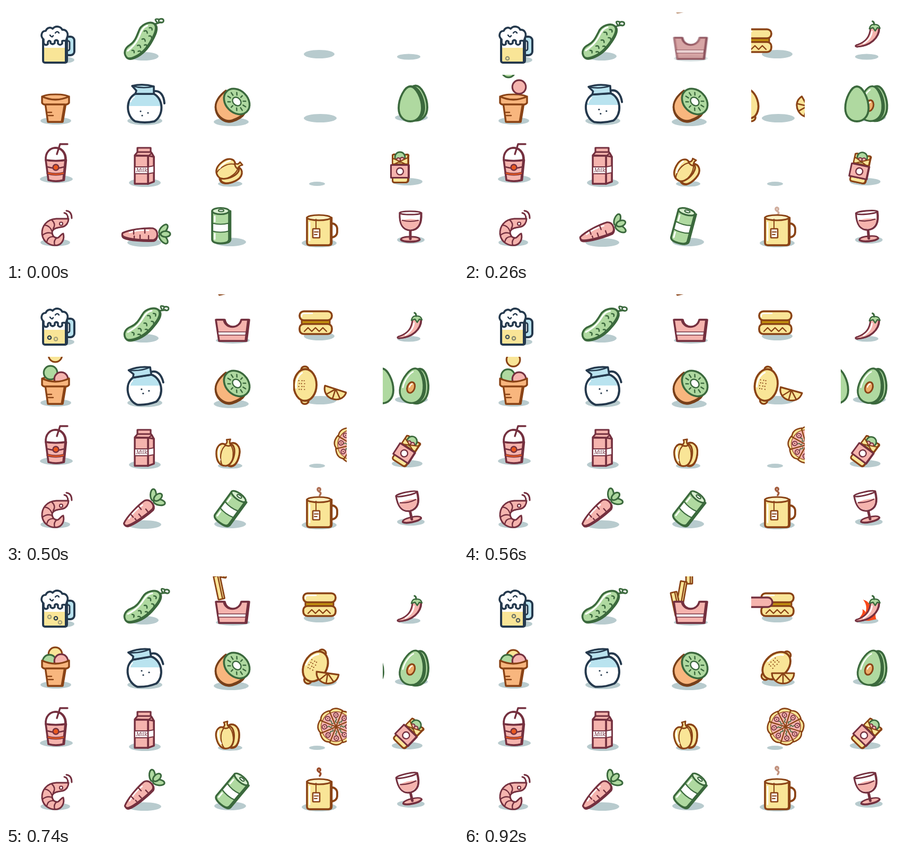
Animation of 853 by 480 pixels, one loop 0.98 s. Source, as an HTML page with a canvas:

```html
<!DOCTYPE html>
<html lang="en">
<head>
<meta charset="utf-8">
<title>Food icons</title>
<style>
html, body { margin: 0; width: 100%; height: 100%; overflow: hidden; background: #fff; }
canvas { display: block; }
</style>
</head>
<body>
<canvas id="stage" width="853" height="480"></canvas>
<script>
const ctx = document.getElementById('stage').getContext('2d');
const NAVY = '#25394d', BLUE = '#b9e3ef', LEAF = '#3b693d', GREEN = '#afd9a0';
const WINE = '#74303f', PINK = '#f5b4ae', BROWN = '#8a4316', YELLOW = '#f9e597';
const ORANGE = '#f8b67e', SHADOW = '#b8cbce', WHITE = '#fff', RED = '#e8581f';
let step = 0;

// Value at the current step, from step/value pairs.
function key(...p) {
  let i = 2;
  while (i < p.length - 2 && step > p[i]) i += 2;
  const u = Math.min(1, Math.max(0, (step - p[i - 2]) / (p[i] - p[i - 2])));
  return p[i - 1] + (p[i + 1] - p[i - 1]) * u;
}
function paint(path, fill, stroke, w = 4) {
  if (fill) { ctx.fillStyle = fill; ctx.fill(path); }
  if (stroke) { ctx.strokeStyle = stroke; ctx.lineWidth = w; ctx.stroke(path); }
}
const ink = (d, fill, stroke, w) => paint(new Path2D(d), fill, stroke, w);
function oval(x, y, rx, ry, fill, stroke, w, deg = 0) {
  const p = new Path2D();
  p.ellipse(x, y, rx, ry, deg * Math.PI / 180, 0, 7);
  paint(p, fill, stroke, w);
}
function box(x, y, w, h, r, fill, stroke, lw) {
  const p = new Path2D();
  p.roundRect(x, y, w, h, r);
  paint(p, fill, stroke, lw);
}
function pose(x, y, deg, draw) {
  ctx.save();
  ctx.translate(x, y);
  ctx.rotate(deg * Math.PI / 180);
  draw();
  ctx.restore();
}
const turn = (x, y, deg, draw) => pose(x, y, deg, () => { ctx.translate(-x, -y); draw(); });
// Outlined shape with a dark edge on one side.
function thick(d, fill, stroke, dx, dy, w) {
  pose(dx, dy, 0, () => ink(d, stroke, stroke, w));
  ink(d, fill, stroke, w);
}
function clip(x, y, draw) {
  ctx.save();
  ctx.beginPath();
  ctx.rect(x, y, 101, 101);
  ctx.clip();
  draw();
  ctx.restore();
}
function fade(alpha, draw) {
  ctx.save();
  ctx.globalAlpha = alpha;
  draw();
  ctx.restore();
}
const shade = (x, y, rx, ry) => oval(x, y, rx, ry, SHADOW);

function beer() {
  shade(101, 102, 28, 7);
  box(111, 58, 18, 35, 7, BLUE, NAVY, 4);
  box(112, 66, 8, 18, 3, WHITE, NAVY, 3);
  thick('M70 60V103Q70 107 75 107H108Q113 107 113 103V60Z', WHITE, NAVY, 2, 0);
  ink('M72 79H111V105H74Q72 105 72 102Z', YELLOW);
  [[82, 2, key(1, 0, 2, .5, 6, 1, 8, .7, 13, 0)], [94, 4, key(3, 0, 6, .4, 10, 1, 13, .65)],
   [102, 10, key(9, 0, 10, .4, 13, .8)]].forEach(([x, born, a]) =>
    fade(a, () => oval(x, 99 - 1.3 * (step - born), 3.2, 3.2, null, NAVY, 2.2)));
  ink('M71 63C64 57 67 47 75 47C77 41 84 39 88 43C94 36 104 39 106 45C114 44 119 52 115 60' +
    'L113 66Q109 65 106 66V71Q102 76 98 71V66Q95 63 92 66V70Q88 74 84 70V67Q81 64 79 68V72Q74 76 71 70Z',
    WHITE, NAVY, 3.6);
  ink('M83 55q4 6 6 1M93 51q4 -5 7 0', null, NAVY, 2.5);
}

function cucumber() {
  shade(260, 95, 28, 8);
  turn(238, 85, key(0, -12, 2, -6.5, 4, -3.5, 6, -1.5, 8, 0), () => {
    ink('M288 44C295 45 299 42 303 44C309 45 310 38 304 37C298 36 297 44 302 43M296 43Q289 32 300 37',
      null, LEAF, 3);
    thick('M225 94C221 86 225 77 236 73C247 69 252 60 258 51C264 40 282 36 289 43' +
      'C295 50 287 62 278 72C268 84 254 94 240 97C232 99 227 98 225 94Z', GREEN, LEAF, 1.5, 1.5, 3.6);
    ink('M230 83C241 77 250 72 260 56C265 48 270 45 276 44', null, WHITE, 3);
    ink('M238 84q5 0 3 5M250 77q6-1 5 5M261 67q6-1 5 5M268 53q6-1 5 5M279 49q6 0 4 5' +
      'M249 88q5-1 5 3M263 79q5-1 4 3M275 64q5 0 4 4', null, LEAF, 2.5);
  });
}

function fry(x, y, deg) {
  pose(x, y, deg, () => {
    box(-6, -45, 12, 45, 1, YELLOW, BROWN, 2.8);
    ink('M2 -44V-1', null, BROWN, 2.4);
  });
}
function fries() {
  fade(key(1, 0, 2, .5, 4, .82, 6, 1), () => {
    shade(428, 99, 32, 6);
    fry(425, key(12, 0, 13, 26), 0);
    fry(key(10, 409, 13, 407), key(9, 2, 10, 14, 13, 66), 10);
    fry(key(8, 408, 13, 405), key(7, 12, 8, 33, 10, 55, 13, 86), -12);
    thick('M396 60H411C414 78 440 78 444 60H457L452 100H402Z', PINK, WINE, 2, 0, 3.6);
    ink('M400 83H453L452 89H401Z', WHITE, WINE, 1.5);
  });
}

function hotdog() {
  shade(591, 91, 29, 8);
  pose(key(0, -85, 2, -42, 4, -21, 6, -7, 8, -1, 10, 0), 0, 0, () => {
    box(565, 58, 53, 12, 3, '#c4940e', BROWN, 3);
    box(561, 44, 61, 17, 8, YELLOW, BROWN, 3.6);
    box(561, 68, 61, 19, 8, YELLOW, BROWN, 3.6);
    ink('M565 54V52Q565 48 570 48H585', null, WHITE, 2.5);
    ink('M570 82L577 75L584 82L591 75L598 82L605 75L612 82', null, BROWN, 2.4);
  });
  box(500, 52, key(10, 20, 13, 82), 18, 9, PINK, WINE, 3.4);
}

function chili() {
  shade(760, 96, 22, 5.5);
  fade(key(11, 0, 13, 1), () => ink('M744 95C748 86 754 84 752 74Q756 76 758 80C761 70 758 62 753 56' +
    'C765 59 768 68 769 79L776 73C778 82 775 85 778 93L764 96Z', '#f9491b'));
  pose(0, key(0, -90, 2, -20, 4, 5, 6, -2, 8, 0), 0, () => {
    thick('M767 62C772 56 780 56 783 62C783 80 766 96 741 97C737 96 739 94 743 93C758 88 766 78 767 62Z',
      PINK, WINE, 1, 0, 2.8);
    ink('M770 68C769 78 762 86 754 91', null, WHITE, 2.5);
    ink('M765 63Q767 54 774 55Q783 54 785 62L780 61L776 67L772 61Z', GREEN, LEAF, 2.4);
    ink('M774 55Q774 50 771 49', null, LEAF, 3.4);
  });
}

function pot() {
  shade(94, 217, 29, 7);
  oval(93.5, 172, 25, 5, ORANGE, BROWN, 3);
  const scoop = (x, y, fill, edge) => oval(x, y, 12.8, 12.8, fill, edge, 3.2);
  scoop(93, key(4, 108, 6, 127, 8, 144, 10, 159, 13, 164), YELLOW, BROWN);
  scoop(key(6, 84, 8, 82), key(0, 105, 2, 122, 4, 141, 6, 160, 8, 173), GREEN, LEAF);
  scoop(104, key(0, 110, 2, 153, 4, 172), PINK, WINE);
  thick('M74 184L79 219H105L111 184Z', ORANGE, BROWN, 2, 0, 3.4);
  ink('M68 171Q93 183 119 171V183Q116 187 110 186H76Q70 187 68 183Z', ORANGE, BROWN, 3.4);
  ink('M79 201H86M80 207H89', null, BROWN, 2.4);
}

function jug() {
  shade(262, 217, 33, 8);
  const tilt = key(0, 0, 2, -4, 4, -7, 6, -9, 8, -10);
  turn(262, 195, tilt, () => {
    ink('M279 161C291 159 298 169 299 184', null, NAVY, 4);
    const body = new Path2D('M244 166C225 176 226 208 244 218Q262 222 280 218C298 207 298 176 279 166Z');
    paint(body, WHITE);
    ctx.save();
    ctx.clip(body);
    turn(262, 195, -tilt, () => {
      ctx.fillStyle = BLUE;
      ctx.fillRect(215, 150, 95, 39 + tilt * .5);
    });
    ctx.restore();
    paint(body, null, NAVY, 4);
    ink('M244 166L246 160L238 151Q258 146 279 152V166Z', BLUE, NAVY, 3.6);
    ink('M238 151Q258 157 279 152', null, NAVY, 2.6);
    ink('M235 181Q237 175 242 172', null, WHITE, 2.5);
  });
  [[254, 199], [268, 202], [257, 207]].forEach(([x, y]) =>
    oval(x - tilt * .2, y + tilt * .85, 1.6, 1.6, NAVY));
}

function kiwi() {
  shade(425, 219, 33, 8);
  thick('M415 160C403 169 393 182 396 195C399 210 414 220 427 216C436 213 446 208 450 201Z',
    ORANGE, '#78401a', 0, 2, 3.6);
  pose(435.5, 180.5, 45, () => {
    oval(0, 0, 27, 21, GREEN, LEAF, 3.6);
    oval(0, 0, 9, 7, WHITE, LEAF, 2.4);
    for (let i = 0; i < 10; i++) {
      const a = i * Math.PI / 5 + .3, c = Math.cos(a), s = Math.sin(a);
      ink(`M${c * 14} ${s * 11}L${c * 20} ${s * 15}`, null, LEAF, 2.4);
    }
  });
}

function lemon() {
  shade(593, 212, 31, 8);
  pose(key(0, 505, 2, 532, 4, 550, 6, 563.5, 8, 575, 10, 583, 13, 589),
    key(0, 184, 8, 183, 13, 180), key(2, -20, 4, -8, 6, 1, 8, 17, 10, 29, 13, 47), () => {
      oval(0, -29, 7, 6, YELLOW, BROWN, 3.4);
      oval(1, 30, 7, 6, YELLOW, BROWN, 3.4);
      oval(1, 0, 21.5, 30, YELLOW, BROWN, 3.8);
      ink('M-16 6C-17 -8 -12 -18 -5 -23', null, WHITE, 2.8);
      for (let i = 0; i < 12; i++) oval(-11 + i % 3 * 5 + (i % 2), -8 + Math.floor(i / 3) * 5.5, 1.1, 1.1, BROWN);
    });
  pose(key(0, 680, 2, 648, 4, 634, 6, 622, 8, 613.5, 10, 607, 13, 602),
    key(0, 190, 4, 188, 6, 191, 8, 195, 13, 195), key(2, 60, 4, 35, 6, 18, 8, 13, 10, 8, 13, 0), () => {
      ink('M-21 0H21C20 26 -20 26 -21 0Z', YELLOW, BROWN, 3.2);
      ink('M0 0L-13 14M0 0V18M0 0L13 14', null, BROWN, 2.6);
    });
}

const EGG = 'M0 -33C11 -33 22 -10 22 8C22 24 12 33 0 33C-12 33 -22 24 -22 8C-22 -10 -11 -33 0 -33Z';
function avocado() {
  shade(765, 211, 31, 7);
  pose(key(0, 764, 2, 768, 4, 767), 184.5, key(0, 0, 2, 5, 4, 10, 8, 13), () => {
    pose(9, -1, 0, () => ink(EGG, GREEN, LEAF, 4));
    pose(5, 0, 0, () => ink(EGG, LEAF));
    ink(EGG, GREEN, LEAF, 3.4);
    ink('M-17 7C-17 -8 -10 -21 -4 -26', null, WHITE, 2.4);
    oval(-2, 4, 7, 10.5, '#edae69', BROWN, 3, 8);
    ink('M-5 4Q-4 -2 -1 -3', null, WHITE, 2);
  });
  pose(key(0, 763, 2, 741.5, 4, 724, 6, 709, 8, 697, 10, 690, 13, 680), 185, 0,
    () => ink(EGG, GREEN, LEAF, 3.8));
}

function cup() {
  shade(95, 327, 31, 7.5);
  thick('M75 291L80 329Q94 333 108 329L112 291Z', PINK, WINE, 1.5, 0, 3.6);
  thick('M75 291C73 261 113 260 112 291Q94 294 75 291Z', WHITE, WINE, 1, 0, 3.6);
  ink('M96 280L102 261H116', null, WINE, 3.4);
  ink('M78 304Q94 309 110 304', null, WINE, 2.4);
  ink('M79 316Q94 320 109 316', null, WINE, 5);
  ink('M80 316Q94 320 108 316', null, RED, 2.4);
  oval(94, 305, 5.5, 5.5, RED, WINE, 2.4);
}

function milk() {
  shade(262, 334, 30, 8);
  thick('M268 283L275 278L279 285V332L268 336Z', PINK, WINE, 0, 0, 3.4);
  ink('M243 282L249 275H273L279 285L268 283Z', PINK, WINE, 3.2);
  ink('M248 268H273V276H248Z', PINK, WINE, 3.2);
  ink('M243 283H268V336H243Z', PINK, WINE, 3.4);
  ink('M243 304H268L279 302V315L268 317H243Z', WHITE, WINE, 1.8);
  ink('M268 284L275 278M268 284V336', null, WINE, 2.6);
  ctx.fillStyle = WINE;
  ctx.font = 'italic 10px "Noto Serif", serif';
  ctx.textAlign = 'center';
  ctx.fillText('Milk', 256, 314);
}

function pepper() {
  shade(423, 336, 23, 5.5);
  turn(421, 315, key(0, 66, 2, 42, 4, 25, 6, 11, 8, 2, 10, 0), () => {
    thick('M416 296C428 286 440 295 440 311C440 328 434 337 424 335Z', YELLOW, BROWN, 0, 1, 3.4);
    ink('M412 298C400 293 394 306 397 318C400 332 408 339 418 337C434 335 434 296 421 295Q416 294 412 298Z',
      YELLOW, BROWN, 3.2);
    ink('M412 298C402 308 405 328 412 337M420 296C431 306 431 327 425 334', null, BROWN, 2.2);
    ink('M401 304Q399 318 406 328', null, WHITE, 2.8);
    ink('M409 298Q415 294 411 288L418 286Q416 293 421 297Q416 301 409 298Z', YELLOW, BROWN, 2.8);
  });
}

function pizza() {
  shade(587, 336, 15, 4);
  const x = key(0, 735, 2, 700, 4, 674, 6, 654, 8, 638, 10, 623, 13, 607);
  pose(x, 296, (x - 607) * .3, () => {
    for (let i = 0; i < 8; i++) pose(0, 0, i * 45 + 15, () => {
      ink('M0 0L31 1Q37 14 22 24Z', YELLOW, BROWN, 2.6);
      ink('M2 1L27 2Q30 12 19 20Z', PINK);
      ink('M28 2Q27 14 20 20', null, BROWN, 1.2);
      oval(20, 9, 4.5, 4, PINK, WINE, 1.8);
      oval(20, 9, 1.2, 1.2, WINE);
      ink('M7 4q3-3 4 1q1 3 4 1', null, LEAF, 1.6);
    });
  });
}

function burrito() {
  shade(757, 332, 29, 7);
  pose(key(0, 743.5, 2, 746, 4, 749, 6, 751.5, 8, 753.5, 10, 755), 312.5,
    key(0, 0, 2, 12, 4, 24, 6, 33, 8, 40, 10, 44), () => {
      thick('M-14 -31Q-9 -34 -6 -29L14 -32Q16 -31 15 -28V16Q15 21 10 21H-10Q-14 21 -14 17Z',
        YELLOW, BROWN, 1, 0, 3);
      oval(0, -27, 9.5, 9.5, GREEN, LEAF, 2.8);
      oval(-3, -22, 3.6, 3.6, PINK, WINE, 2);
      oval(4, -23, 3.6, 3.6, PINK, WINE, 2);
      ink('M-14 -25L10 -14H-14ZM15 -26L-10 -14H15Z', YELLOW, BROWN, 2.2);
      thick('M-17 -12H16V12H-17Z', PINK, WINE, 1, 0, 3);
      oval(0, 0, 6.5, 6.5, WHITE, WINE, 2.4);
    });
}

function shrimp() {
  shade(93, 447, 28, 7);
  ink('M110 391Q117 392 117 403M114 387Q124 388 124 401', null, WINE, 3);
  ink('M118 402L95 402C76 403 67 417 68 431C70 446 83 454 97 452C106 450 111 440 108 430' +
    'C104 431 102 436 98 438C91 439 87 434 87 427C89 419 99 419 108 417C114 415 118 409 118 402Z',
    PINK, WINE, 3);
  ink('M86 404Q95 412 89 421M73 414Q83 415 87 426M69 433Q78 426 87 430M77 446Q79 435 90 436' +
    'M92 452Q89 443 96 438', null, WINE, 2.4);
  oval(104, 411.5, 3, 3, WHITE, WINE, 2.2);
}

function carrot() {
  shade(261, 447, 32, 8);
  pose(key(0, 219, 2, 219, 4, 221, 6, 223, 8, 225), key(0, 431, 2, 439, 4, 443, 6, 447, 8, 448),
    key(0, 0, 2, -20, 4, -32, 6, -39, 8, -43), () => {
      oval(78, -9, 11, 5.5, GREEN, LEAF, 3, -50);
      oval(78, 9, 11, 5.5, GREEN, LEAF, 3, 50);
      oval(82, 0, 9, 5.5, GREEN, LEAF, 3);
      thick('M1 -2C12 -8 42 -12 58 -11C69 -8 69 8 60 11C43 12 13 10 3 5Q-1 2 1 -2Z', PINK, WINE, 0, 2.2, 3.2);
      ink('M14 -3C26 -7 38 -8 50 -7', null, WHITE, 2.6);
      ink('M22 -6V0M34 2V8M43 -9V-2M50 3V9M23 4V7', null, WINE, 2.4);
    });
}

function can() {
  shade(423, 446, 30, 8);
  pose(key(0, 405, 2, 413, 4, 419, 6, 422.5, 8, 425.5, 10, 426), key(0, 415.5, 8, 417),
    key(0, 0, 2, 15, 4, 28, 6, 36, 8, 40), () => {
      thick('M-16 -28V26Q-15 33 0 33Q15 33 16 26V-28Z', GREEN, LEAF, 2.5, 0, 3.6);
      ink('M-15 -5Q0 -1 15 -5V10Q0 14 -15 10Z', WHITE, LEAF, 2.2);
      ink('M-11 -18V-8M-11 15V25', null, WHITE, 2.8);
      oval(0, -28, 16, 6, '#d9efd0', LEAF, 3.2);
      oval(1, -29, 5, 2.2, WHITE, LEAF, 2.2);
    });
}

function mug() {
  shade(591, 448, 33, 8);
  fade(key(0, 0, 2, .45, 4, .6, 6, .8, 8, 1, 10, 1, 13, .6), () =>
    pose(0, key(2, 0, 4, -2, 8, -4, 10, -6, 13, -9), 0, () =>
      ink('M592 395C598 387 587 389 588 383C589 379 594 381 593 385', null, '#9a4b29', 3.6)));
  box(605, 411, 20, 26, 10, WHITE, BROWN, 3.8);
  thick('M568 400V447Q568 452 573 452H608Q613 452 613 447V400Z', YELLOW, BROWN, 1.5, 0, 3.6);
  oval(590.5, 400, 22.5, 5, '#fdf2c4', BROWN, 3.2);
  ink('M573 409V443', null, WHITE, 2.6);
  ink('M585 403V421', null, BROWN, 2);
  box(579, 421, 13, 17, 1, WHITE, BROWN, 2.6);
  ink('M582 427H589M582 432H587', null, BROWN, 2);
}

function wine() {
  shade(764, 442, 26, 7);
  pose(key(0, 763, 2, 764, 8, 767), key(0, 441, 8, 437), key(0, 0, 2, -5, 4, -8, 6, -12, 8, -13), () => {
    thick('M-18 0Q-16 -5 0 -5Q16 -5 18 0Q14 4 0 4Q-14 4 -18 0Z', PINK, WINE, 0, 1, 2.8);
    ink('M0 -17V-1', null, WINE, 5);
    thick('M-20 -50C-21 -30 -16 -18 0 -17C16 -18 21 -30 20 -50Z', WHITE, WINE, 1, 0, 3.2);
    ink('M-18 -36Q0 -41 18 -36Q15 -20 0 -19Q-15 -20 -18 -36Z', PINK);
    ink('M-15 -36Q0 -32 15 -36', null, WINE, 2.2);
    oval(0, -50, 20, 3.2, WHITE, WINE, 2.8);
  });
}

function render(now) {
  const t = now % 980;
  step = t < 260 ? Math.floor(t / 130) : 2 + Math.floor((t - 260) / 60);
  ctx.fillStyle = WHITE;
  ctx.fillRect(0, 0, 853, 480);
  ctx.lineCap = ctx.lineJoin = 'round';
  [beer, cucumber, jug, kiwi, cup, milk, pepper, burrito, shrimp, carrot, can, mug, wine].forEach(draw => draw());
  clip(377, 12, fries);
  clip(542, 12, hotdog);
  clip(711, 12, chili);
  clip(44, 130, pot);
  clip(542, 130, lemon);
  clip(711, 130, avocado);
  clip(542, 248, pizza);
}
const start = performance.now();
function loop() {
  render(performance.now() - start);
  requestAnimationFrame(loop);
}
loop();
</script>
</body>
</html>
```
